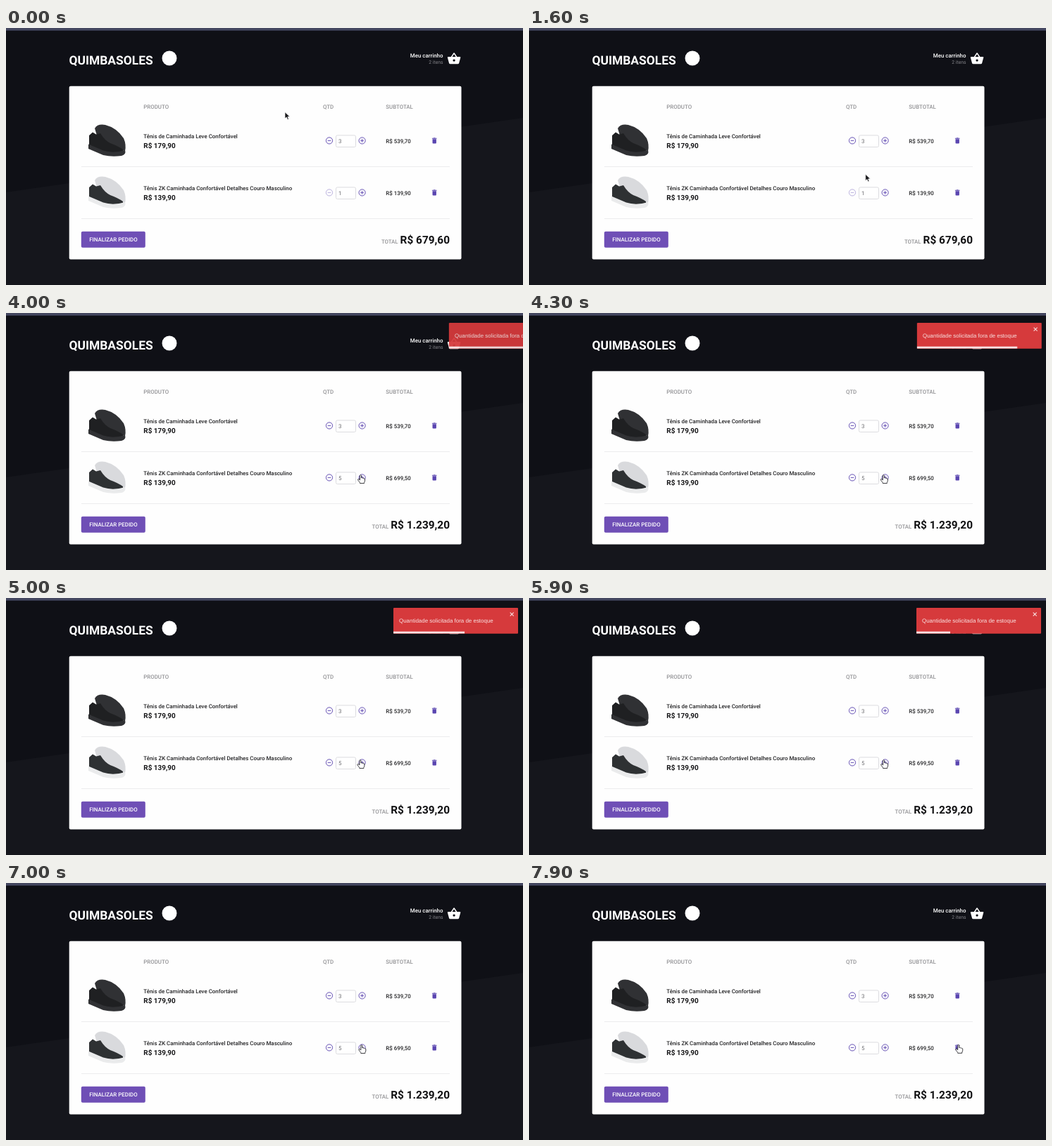
Animation, 734 px wide and 366 px high, one loop 8000 ms. Source, as an HTML page:

```html
<!DOCTYPE html>
<html lang="pt-BR">
<head>
<meta charset="utf-8">
<title>Carrinho</title>
<style>
html, body { margin: 0; width: 100%; height: 100%; overflow: hidden; background: #15161c; }
svg { display: block; }
text { font: 500 7.9px Roboto, sans-serif; fill: #242426; white-space: pre; text-rendering: geometricPrecision; }
.logo { font-size: 17.4px; font-weight: 700; fill: #fff; }
.head { fill: #939396; }
.price { font-size: 9.95px; font-weight: 700; fill: #161618; }
.total { font-size: 15.4px; font-weight: 700; fill: #111113; }
.qty { font-weight: 400; fill: #6a6a6e; }
.end { text-anchor: end; }
.icon { fill: none; stroke: #6550b4; stroke-width: 1; }
.bin { fill: #5a45b0; }

#toast {
  animation: enter .75s cubic-bezier(.215, .61, .355, 1) both, leave .75s ease forwards;
  animation-delay: calc(3712ms - var(--t)), calc(6738ms - var(--t));
  animation-play-state: paused;
}
#bar {
  transform-origin: 550px 0;
  animation: drain 3s linear both paused;
  animation-delay: calc(3716ms - var(--t));
}
#toast text { font: 7.95px "Liberation Sans", Arial, sans-serif; fill: #f9e2e2; }
@keyframes enter {
  from { opacity: 0; transform: translateX(1660px); }
  60% { opacity: 1; transform: translateX(-13.8px); }
  75% { transform: translateX(5.5px); }
  90% { transform: translateX(-2.8px); }
  to { opacity: 1; transform: none; }
}
@keyframes leave {
  20% { opacity: 1; transform: translateX(-11px); }
  to { opacity: 0; transform: translateX(1106px); }
}
@keyframes drain { from { transform: scaleX(1); } to { transform: scaleX(0); } }
</style>
</head>
<body>
<svg id="stage" width="734" height="366" style="--t: 0ms">
  <defs>
    <path id="back" d="M126 143Q130 136 141 138Q157 142 167 157Q171 166 169 175L158 174Q140 164 129 153Z"/>
    <path id="upper" d="M118 153L123 148.5L128 151.5L134 150Q140 160 148 164Q159 168 166 173Q167 177 160 177.5Q148 178 138 175.5L118 167Z"/>
    <path id="sole" d="M117 165.5L138 174.5Q152 179 169 174Q171 180 164 182Q150 184 138 181L117 172Z"/>
    <g id="minus"><circle r="4.6"/><path d="M-2.3 0H2.3"/></g>
    <g id="plus"><circle r="4.6"/><path d="M-2.3 0H2.3M0 -2.3V2.3"/></g>
    <path id="bin" d="M-2.7 -2.2H2.7V3.2Q2.7 4.2 1.7 4.2H-1.7Q-2.7 4.2 -2.7 3.2ZM-3.3 -3.7H-1.5L-1 -4.2H1L1.5 -3.7H3.3V-2.7H-3.3Z"/>
  </defs>

  <rect width="734" height="366" fill="#15161c"/>
  <path d="M0 0H734V128L0 234Z" fill="#0f1016"/>
  <rect width="734" height="3.7" fill="#444760"/>

  <text class="logo" x="89.5" y="52">QUIMBASOLES</text>
  <circle cx="232" cy="43" r="10.5" fill="#fff"/>
  <text class="end" x="620.5" y="42.3" style="fill:#fff">Meu carrinho</text>
  <text class="end" x="620.5" y="51.3" style="font-size:6.8px;font-weight:400;fill:#85858a">2 itens</text>
  <path transform="translate(626 33.5) scale(.84)" fill="#fff" fill-rule="evenodd" d="M17.2 9L12.8 2.4Q12 1.6 11.2 2.4L6.8 9H2Q1 9 1 10.2L3.6 19.5Q4 21 5.5 21H18.5Q20 21 20.4 19.5L23 10.2Q23 9 22 9ZM9 9L12 4.6L15 9ZM12 17A2 2 0 1 1 12 13A2 2 0 1 1 12 17Z"/>

  <rect x="89.7" y="82.8" width="556.8" height="246.8" rx="2" fill="#fefefe"/>
  <text class="head" x="195.3" y="115.3">PRODUTO</text>
  <text class="head" x="450" y="115.3">QTD</text>
  <text class="head" x="539.3" y="115.3">SUBTOTAL</text>

  <g id="rows"></g>

  <rect x="106.8" y="289.7" width="91" height="23" rx="2" fill="#6f4fb6"/>
  <text x="152.5" y="304.2" text-anchor="middle" style="fill:#fff">FINALIZAR PEDIDO</text>
  <text class="end" x="630" y="306.8"><tspan class="head">TOTAL</tspan><tspan class="total" id="total" dx="3"></tspan></text>

  <g id="toast">
    <rect x="550" y="14" width="177" height="36.7" rx="1" fill="#d63a3c"/>
    <text x="558" y="35.3">Quantidade solicitada fora de estoque</text>
    <path d="M715.7 20.7L720.7 25.7M720.7 20.7L715.7 25.7" stroke="#f9e2e2" stroke-width="1.1"/>
    <rect id="bar" x="550" y="47.7" width="177" height="2.8" fill="#fff" fill-opacity=".85"/>
  </g>

  <g id="cursor">
    <path id="arrow" d="M0 0V9.3L2.2 7.3L3.8 10.7L5.4 10L3.9 6.7L6.8 6.5Z" fill="#17171a" stroke="#fff" stroke-width=".7"/>
    <path id="hand" d="M-1 1Q0 -.5 1 1V4.5Q2.2 3.8 2.8 4.9Q4 4.3 4.5 5.4Q6 5.2 6 6.6V8.6Q5.8 10 5 11V12.3H-1V11.4Q-2.5 9.5 -4 7.3Q-4 5.8 -2.5 6.3L-1 7.6Z" fill="#fff" stroke="#26262b" stroke-width=".9"/>
  </g>
</svg>
<script>
const LOOP = 8000, STEP = 100;
const $ = id => document.getElementById(id);

const items = [
  { name: 'Tênis de Caminhada Leve Confortável', price: 179.9, back: '#303134', upper: '#1f2022', sole: '#303134' },
  { name: 'Tênis ZK Caminhada Confortável Detalhes Couro Masculino', price: 139.9, back: '#d9dadd', upper: '#2e3133', sole: '#eaebec' }
];
const addTimes = [2300, 2500, 2800, 3300];

// time, x, y of the pointer tip
const path = [
  [0, 396, 119.7], [900, 396, 119.7], [1000, 401, 125], [1100, 419, 143], [1200, 443, 168], [1300, 459.7, 185],
  [1400, 459.7, 185], [1600, 477.7, 208.3], [1800, 497, 227], [1900, 502, 230], [2100, 503.5, 230.3],
  [4000, 503.5, 230.3], [4900, 502.8, 230.3], [6600, 504.2, 230.3], [7100, 505, 230.3], [7200, 513, 231],
  [7400, 557.7, 228.5], [7500, 557.7, 228.5], [7600, 610.7, 228.5], [7700, 610.7, 228.5], [7800, 617, 229.5], [7900, 609.7, 230]
];

const money = n => 'R$ ' + n.toFixed(2).replace('.', ',').replace(/(\d)(\d{3},)/, '$1.$2');

$('rows').innerHTML = items.map((it, i) => `
  <g transform="translate(0 ${i * 74})">
    <use href="#back" fill="${it.back}"/>
    <use href="#upper" fill="${it.upper}"/>
    <use href="#sole" fill="${it.sole}"/>
    <text x="195.3" y="156.8">${it.name}</text>
    <text class="price" x="195.3" y="171">${money(it.price)}</text>
    <use id="less${i}" class="icon" href="#minus" x="459" y="160.4"/>
    <rect x="468.5" y="152.9" width="28" height="16.6" rx="2" fill="#fff" stroke="#dcdce0"/>
    <text class="qty" id="qty${i}" x="472" y="164"></text>
    <use class="icon" href="#plus" x="505.6" y="160.4"/>
    <text id="sub${i}" x="539.3" y="164"></text>
    <use class="bin" href="#bin" x="608.2" y="160.4"/>
    <path d="M107 197.5H630" stroke="#ececee"/>
  </g>`).join('');

function pointer(t) {
  const i = path.findIndex(p => p[0] > t);
  if (i < 0) return path[path.length - 1].slice(1);
  const [a, b] = [path[i - 1], path[i]];
  const k = (t - a[0]) / (b[0] - a[0]);
  return [1, 2].map(n => a[n] + (b[n] - a[n]) * k);
}

function draw(t) {
  const counts = [3, 1 + addTimes.filter(at => t >= at).length];
  let sum = 0;
  items.forEach((it, i) => {
    const cost = it.price * counts[i];
    sum += cost;
    $('qty' + i).textContent = counts[i];
    $('sub' + i).textContent = money(cost);
    $('less' + i).style.opacity = counts[i] > 1 ? 1 : .45;
  });
  $('total').textContent = money(sum);

  const overButton = t >= 1900 && t < 7200 || t >= 7800;
  $('hand').style.display = overButton ? '' : 'none';
  $('arrow').style.display = overButton ? 'none' : '';
  $('cursor').setAttribute('transform', `translate(${pointer(t)})`);
  $('stage').style.setProperty('--t', t + 'ms');
}

// The picture advances ten times a second
let start, last = -1;
function tick() {
  const now = performance.now();
  start ??= now;
  const t = Math.floor((now - start) % LOOP / STEP) * STEP;
  if (t !== last) draw(last = t);
  requestAnimationFrame(tick);
}
tick();
</script>
</body>
</html>
```
